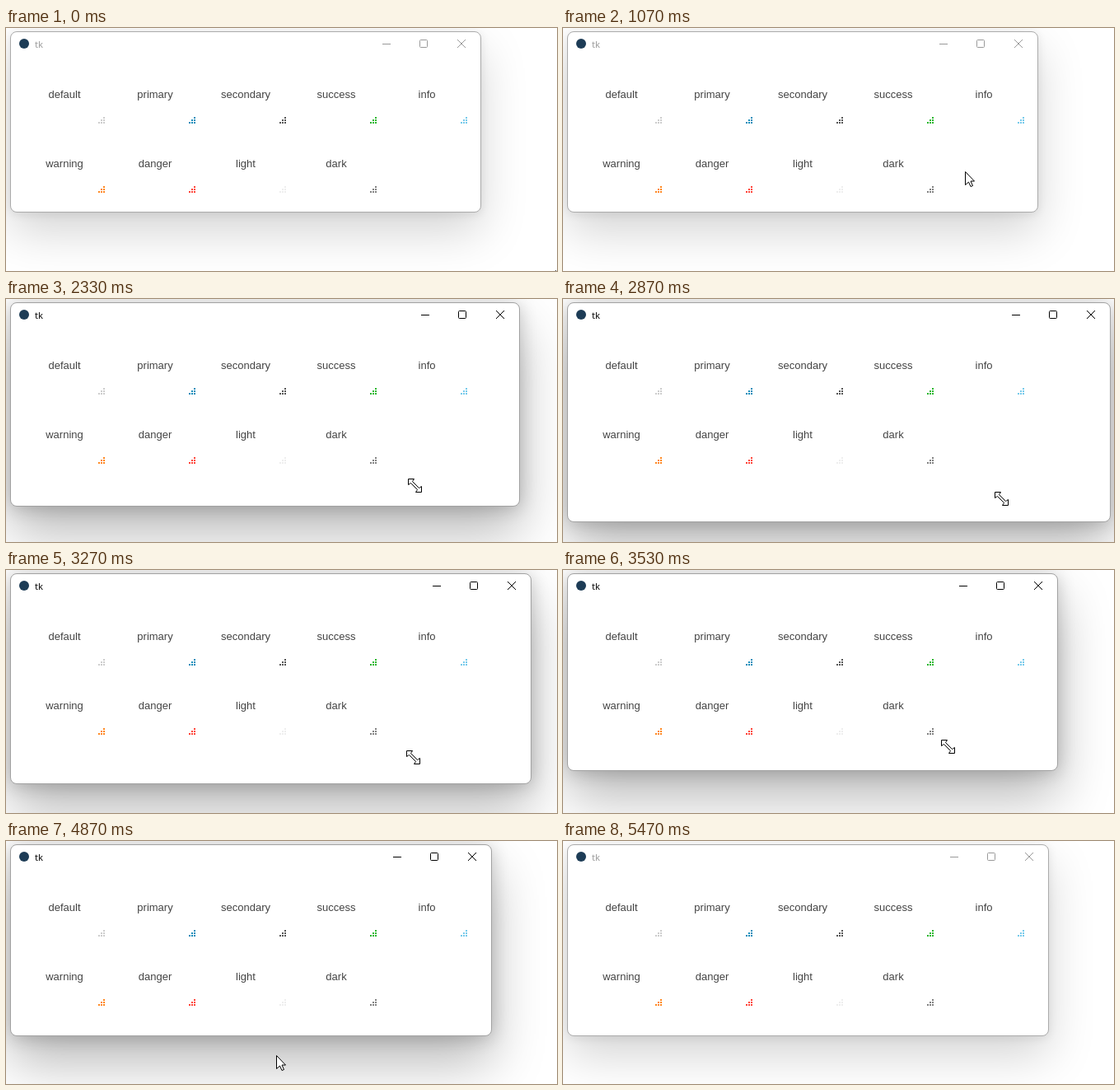
An HTML page for the animation above (5590 ms loop, 669 by 295 pixels).

```html
<!DOCTYPE html>
<html lang="en">
<head>
<meta charset="utf-8">
<style>
html, body { margin: 0; width: 100%; height: 100%; overflow: hidden; background: #fff; }
#win {
  position: absolute; left: 5px; top: 4px; box-sizing: border-box;
  background: #fff; border: 1px solid #ababab; border-radius: 8px;
  box-shadow: 0 24px 56px rgba(0,0,0,.17), 0 2px 12px rgba(0,0,0,.09);
}
#win.active {
  border-color: #a2a2a2;
  box-shadow: 0 32px 64px rgba(0,0,0,.28), 0 2px 21px rgba(0,0,0,.2);
}
svg { position: absolute; left: 0; top: 0; }
#title { font: 11.5px "Open Sans", "Noto Sans", sans-serif; }
#labels { font: 13px "Liberation Sans", Arial, sans-serif; fill: #444; text-anchor: middle; }
#cursors path { fill: #fff; stroke: #000; }
</style>
</head>
<body>
<div id="win"></div>
<svg width="669" height="295">
  <circle cx="22" cy="19" r="6" fill="#1d3c56"/>
  <text id="title" x="35" y="24">tk</text>
  <g id="buttons" fill="none">
    <path d="M457 19.5h10"/>
    <rect x="502.5" y="14.5" width="9" height="9" rx="1"/>
    <path d="M548 14l10 10M558 14l-10 10"/>
  </g>
  <g id="labels"></g>
  <g id="grips" shape-rendering="crispEdges"></g>
  <g id="cursors">
    <path id="arrow" d="M.5.5V16.5L4.5 13 7 18.5 9.5 17.5 7 12H11.5Z"/>
    <path id="resize" d="M.5.5H7.5L5.5 3.5 13.5 11.5 16.5 9.5V16.5H9.5L11.5 13.5 3.5 5.5 .5 7.5Z"/>
  </g>
</svg>
<script>
const LOOP = 5590;
const $ = id => document.getElementById(id);

const styles = {
  default: '#ccc', primary: '#158cba', secondary: '#555', success: '#28b62c', info: '#75caeb',
  warning: '#ff851b', danger: '#ff4136', light: '#eee', dark: '#808080'
};

Object.entries(styles).forEach(([name, color], i) => {
  const x = i % 5 * 110, y = Math.floor(i / 5) * 84;
  $('labels').innerHTML += `<text x="${71 + x}" y="${85 + y}">${name}</text>`;
  let dots = '';
  for (let col = 0; col < 3; col++)
    for (let row = 2 - col; row < 3; row++)
      dots += `M${112 + x + col * 3} ${108 + y + row * 3}h2v2h-2z`;
  $('grips').innerHTML += `<path fill="${color}" d="${dots}"/>`;
});

// Keys are [tick, x, y], with 15 ticks per second.
const enter = [[0, 667, 294], [1, 667, 294], [3, 662, 293], [5, 660, 294], [6, 660, 297]];
const approach = [[11, 617, 133], [13, 554, 150], [16, 488, 174], [19, 457, 187]];
const hover = [[20, 444, 183], [24, 436, 187]];
const drag = [
  [28, 0, 0], [34, 47, 28], [35, 52, 31], [42, 88, 47], [45, 88, 47],
  [47, 73, 41], [50, 38, 27], [52, 24, 20], [54, 21, 18], [59, 13, 13]
];
const leave = [[70, 457, 208], [72, 390, 233], [74, 265, 287], [75, 210, 310]];

function at(keys, t) {
  if (t <= keys[0][0]) return keys[0].slice(1);
  for (let i = 1; i < keys.length; i++) {
    const [t0, x0, y0] = keys[i - 1], [t1, x1, y1] = keys[i];
    if (t <= t1) {
      const k = (t - t0) / (t1 - t0);
      return [Math.round(x0 + (x1 - x0) * k), Math.round(y0 + (y1 - y0) * k)];
    }
  }
  return keys[keys.length - 1].slice(1);
}

function place(el, pos) {
  el.style.display = pos ? '' : 'none';
  if (pos) el.setAttribute('transform', `translate(${pos})`);
}

function draw() {
  const t = Math.floor(performance.now() % LOOP * .015 + .1);
  const active = t >= 27 && t < 82;
  const [w, h] = at(drag, t - 1);   // the window trails the pointer by a tick
  const [dx, dy] = at(drag, t);
  const ink = active ? '#000' : '#999';

  $('win').className = active ? 'active' : '';
  $('win').style.width = 572 + w + 'px';
  $('win').style.height = 220 + h + 'px';
  $('title').setAttribute('fill', ink);
  $('buttons').setAttribute('stroke', ink);
  place($('buttons'), [w, 0]);

  place($('arrow'), t < 6 ? at(enter, t)
    : t >= 11 && t < 20 ? at(approach, t)
    : t >= 70 && t < 75 ? at(leave, t) : null);
  place($('resize'), t >= 20 && t < 25 ? at(hover, t)
    : t >= 25 && t < 70 ? [436 + dx, 187 + dy] : null);
  requestAnimationFrame(draw);
}
draw();
</script>
</body>
</html>
```
